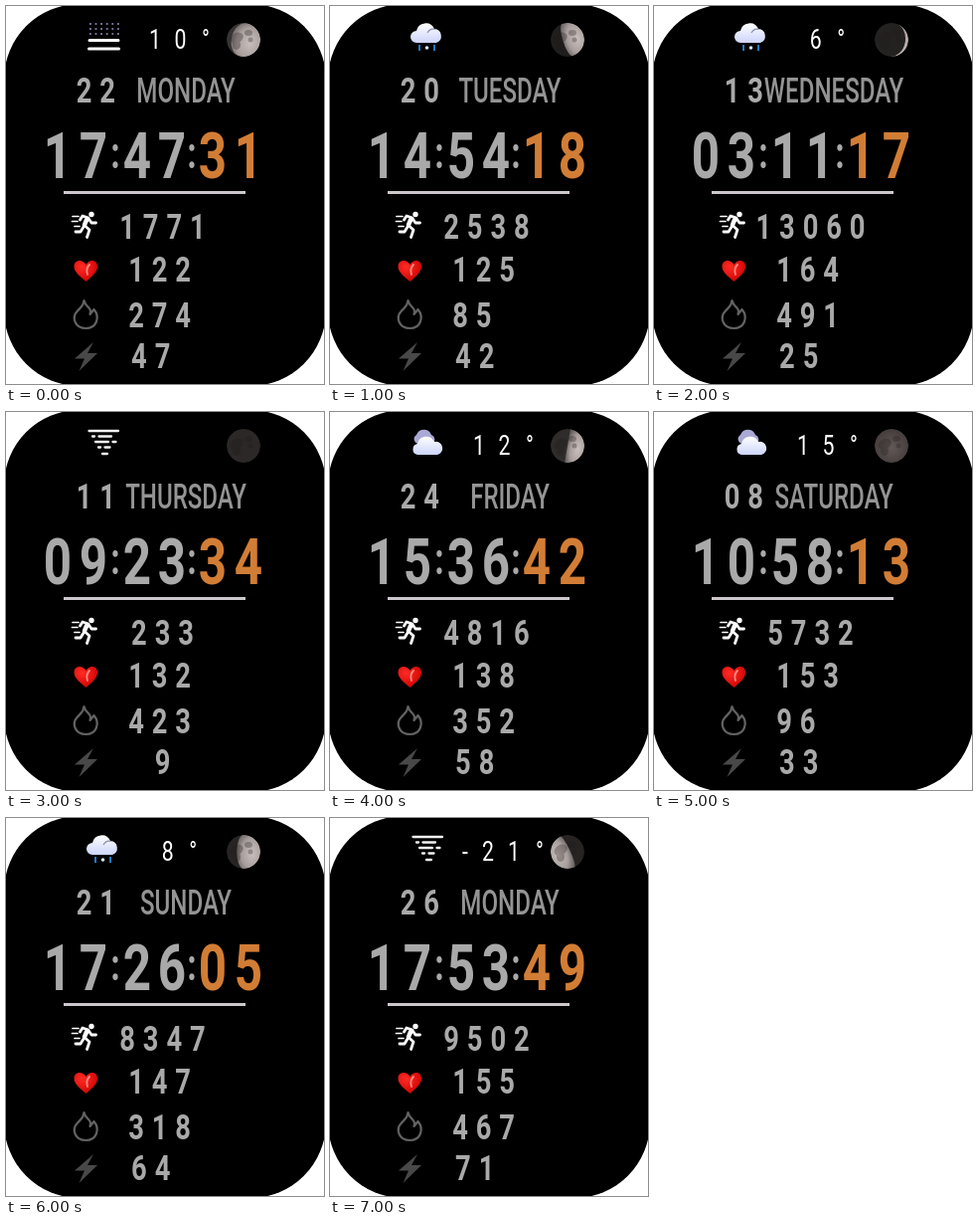
An HTML page that plays this animation: 320 by 380 pixels, repeating every 8000 ms.

```html
<!DOCTYPE html>
<html lang="en">
<head>
<meta charset="utf-8">
<title>Watch face</title>
<style>
  html, body { margin: 0; width: 100%; height: 100%; overflow: hidden; background: #fff; }
  svg { display: block; width: 320px; height: 380px; }
  text { font-family: Roboto, "Liberation Sans", sans-serif; fill: #a9a9a9; text-anchor: middle; }
  .num { font-size: 36px; font-weight: 600; }
  .clock { font-size: 65px; font-weight: 600; }
  .colon { font-size: 44px; font-weight: 600; }
  .day { font-size: 35px; font-weight: 500; fill: #949494; }
  .temp { font-size: 28px; font-weight: 400; fill: #fff; }
  #sec { fill: #d27d35; }
</style>
</head>
<body>
<svg viewBox="0 0 320 380">
  <defs>
    <radialGradient id="lit" cx=".65" cy=".55" r=".75">
      <stop offset="0" stop-color="#c9bfbc"/>
      <stop offset=".6" stop-color="#a79e9c"/>
      <stop offset="1" stop-color="#615b5b"/>
    </radialGradient>
    <radialGradient id="dim" cx=".5" cy=".55" r=".6">
      <stop offset="0" stop-color="#625957"/>
      <stop offset="1" stop-color="#413a39"/>
    </radialGradient>
    <radialGradient id="red" cx=".35" cy=".3" r=".8">
      <stop offset="0" stop-color="#ff2b24"/>
      <stop offset="1" stop-color="#c90000"/>
    </radialGradient>
    <linearGradient id="cloud" x2="0" y2="1">
      <stop offset="0" stop-color="#fff"/>
      <stop offset="1" stop-color="#ccd4fa"/>
    </linearGradient>
    <clipPath id="disc"><circle r="17"/></clipPath>
  </defs>

  <rect x="-2" y="-2" width="324" height="384" rx="76"/>

  <g id="fog">
    <path d="M84 18H114M84 23H114M84 28H114" stroke="#77749c" stroke-width="1.8" stroke-dasharray="1.8 3.8"/>
    <path d="M84 34.5H113M83.5 43H113.5" stroke="#fff" stroke-width="3" stroke-linecap="round"/>
  </g>
  <g id="rain">
    <path d="M87 37A6 6 0 0 1 87 25A9.500 9.500 0 0 1 105 23A7.200 7.200 0 0 1 107 37Z" fill="url(#cloud)"/>
    <path d="M98 27Q101 22 105.500 23.500" fill="none" stroke="#8d8fab" stroke-width="1.2"/>
    <path d="M90 39V45M105 39V45" stroke="#2478bd" stroke-width="2"/>
    <circle cx="97.5" cy="42" r="1.8" fill="#dceaff"/>
  </g>
  <g id="wind" fill="none" stroke="#f2f2f2" stroke-width="2.3" stroke-linecap="round">
    <path d="M83.5 19H113M87 24.5H89M93.500 24.500H106M90 30H103M107.500 30H110.500M93 35.5H95M99.500 35.5H104.500M97 42H102"/>
  </g>
  <g id="clouds">
    <path d="M88 32A5 5 0 0 1 87 23A8 8 0 0 1 102 23A5 5 0 0 1 103 32Z" fill="#aaa9d6"/>
    <path d="M88 43A5.6 5.6 0 0 1 88 32A9 9 0 0 1 105 30A6.6 6.6 0 0 1 108 43Z" fill="url(#cloud)"/>
  </g>

  <g transform="translate(239 34)" clip-path="url(#disc)">
    <circle id="disk" r="17"/>
    <path id="glow" fill="url(#lit)"/>
    <g fill="#211c1d" opacity=".3">
      <ellipse cx="-5" cy="-5" rx="7" ry="5" transform="rotate(-30)"/>
      <ellipse cx="5" cy="-7" rx="4" ry="3"/>
      <ellipse cx="-7" cy="5" rx="4" ry="5"/>
      <circle cx="7" cy="0" r="2.5"/>
    </g>
  </g>

  <path d="M58 187.5H241" stroke="#cbc7cb" stroke-width="3"/>

  <g fill="none" stroke="#fff" stroke-width="2.8" stroke-linejoin="round" stroke-linecap="round">
    <path d="M74.500 215L77 211L83 213L79 220.500L84 225L81.500 232.500M83 213.500L86 218H90.500M78 222L75 227H70"/>
    <path d="M81 215L79 220" stroke-width="4.500"/>
    <path d="M67 211.500H73M66.500 216.500H72M69 221.500H74" stroke-width="1.7"/>
    <circle cx="86" cy="209.5" r="2.7" fill="#fff" stroke="none"/>
  </g>

  <path d="M80.500 277C76 273 68.500 268 68.500 262C68.500 255 77 254 80.500 260C84 254 92 255 92 262C92 268 85 273 80.500 277Z" fill="url(#red)"/>
  <path d="M84 260Q80 264 82 270" fill="none" stroke="#ff8b82" stroke-width="1.800" stroke-linecap="round"/>

  <path d="M78.500 296C80 303 87 303 84.500 310L88.500 305C95 313 91 324 80.500 324C69 324 66 313 71.500 307C75 303 78 302 78.500 296Z"
    fill="none" stroke="#626262" stroke-width="2.2" stroke-linejoin="round"/>
  <path d="M88 338L69 354.500H79L73.500 367L92 349H82Z" fill="#484848"/>

  <!-- condensed lettering: one factor for figures, one for capitals -->
  <g transform="scale(.76 1)">
    <text id="temp" class="temp" y="43"></text>
    <text id="date" class="num" y="97"></text>
    <text id="hm" class="clock" y="173.500"></text>
    <text id="colons" class="colon" y="163.500"></text>
    <text id="sec" class="clock" y="173.500"></text>
    <text id="steps" class="num" y="234"></text>
    <text id="pulse" class="num" y="277.5"></text>
    <text id="burn" class="num" y="323"></text>
    <text id="power" class="num" y="364"></text>
  </g>
  <g transform="translate(181 96.5) scale(.69 1)"><text id="day" class="day"></text></g>
</svg>
<script>
const $ = id => document.getElementById(id);
const K = 0.76, PITCH = 23.6, R = 17;

// weather, temperature, moon [lit part, tilt, base colour], date, day, time, steps, pulse, burn, power
const looks = [
  ["fog", "10°", [0.86, 12, "#383334"], "22", "MONDAY", "17:47:31", "1771", "122", "274", "47"],
  ["rain", "", [0.64, -18, "#201d1d"], "20", "TUESDAY", "14:54:18", "2538", "125", "85", "42"],
  ["rain", "6°", [0.09, 10, "#242121"], "13", "WEDNESDAY", "03:11:17", "13060", "164", "491", "25"],
  ["wind", "", [0, 0, "#2b2827"], "11", "THURSDAY", "09:23:34", "233", "132", "423", "9"],
  ["clouds", "12°", [0.5, 10, "#302c2c"], "24", "FRIDAY", "15:36:42", "4816", "138", "352", "58"],
  ["clouds", "15°", [0, 0, "url(#dim)"], "08", "SATURDAY", "10:58:13", "5732", "153", "96", "33"],
  ["rain", "8°", [0.7, 0, "#282424"], "21", "SUNDAY", "17:26:05", "8347", "147", "318", "64"],
  ["wind", "-21°", [0.58, 155, "#272323"], "26", "MONDAY", "17:53:49", "9502", "155", "467", "71"]
];

function put(id, str, xs) {
  const el = $(id);
  el.textContent = str;
  el.setAttribute("x", xs.map(x => x / K).join(" "));
}

const row = (n, first, step = PITCH) => Array.from({ length: n }, (_, i) => first + i * step);
const centred = (n, mid, step) => row(n, mid - (n - 1) * step / 2, step);

function moon([part, tilt, base]) {
  $("disk").setAttribute("fill", base);
  const k = Math.abs(1 - 2 * part) * R;
  const side = part > 0.5 ? 1 : 0;
  $("glow").setAttribute("d", part ? `M0 ${-R}A${R} ${R} 0 0 1 0 ${R}A${k} ${R} 0 0 ${side} 0 ${-R}Z` : "");
  $("glow").setAttribute("transform", `rotate(${tilt})`);
}

function show([sky, temp, phase, date, day, time, steps, pulse, burn, power]) {
  for (const id of ["fog", "rain", "wind", "clouds"])
    $(id).setAttribute("visibility", id === sky ? "visible" : "hidden");
  moon(phase);
  put("temp", temp, temp[0] === "-" ? [136, 159, 185, 211] : centred(temp.length, 175.5, 25.5));
  put("date", date, row(2, 78.5));
  $("day").textContent = day;
  const [h, m, s] = time.split(":");
  put("hm", h + m, [52, 88, 132, 167]);
  put("colons", "::", [110, 187]);
  put("sec", s, [208, 244]);
  put("steps", steps, centred(steps.length, 157.5, PITCH));
  put("pulse", pulse, row(3, 131));
  put("burn", burn, row(burn.length, 131));
  put("power", power, row(power.length, 157.5 - (power.length - 1) * PITCH));
}

let last = -1;
function tick() {
  const i = Math.floor(performance.now() % 8000 / 1000);
  if (i !== last) show(looks[last = i]);
  requestAnimationFrame(tick);
}
tick();
</script>
</body>
</html>
```
